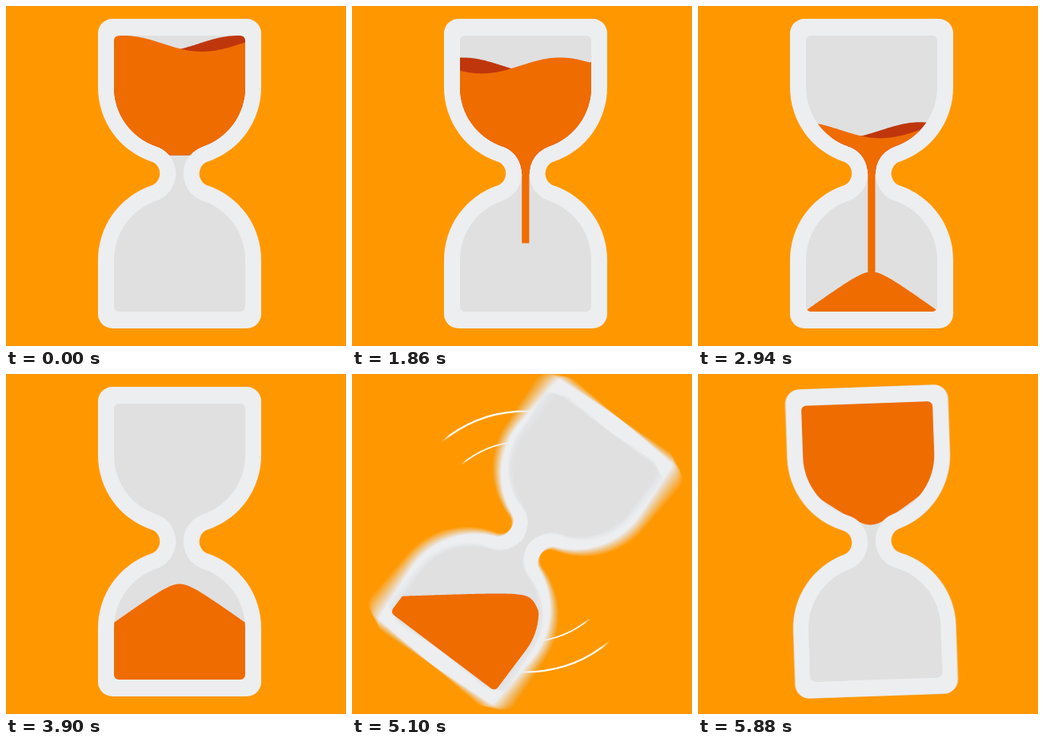
Recreate the animation shown at these times as an HTML page with a canvas. Size 425 px wide and 425 px high, loop 5940 ms.

```html
<!DOCTYPE html>
<html lang="en">
<head>
<meta charset="utf-8">
<title>Hourglass</title>
<style>
  html, body { margin: 0; width: 100%; height: 100%; overflow: hidden; background: #ff9800; }
  canvas { display: block; }
</style>
</head>
<body>
<canvas id="stage" width="425" height="425"></canvas>
<script>
const SIZE = 425, CX = 217, CY = 209.5;
const LOOP = 5940, STEP = 60;
const RAD = Math.PI / 180;
const BG = '#ff9800', FRAME = '#edeef0', GLASS = '#e0e0e0', SAND = '#ef6c00', SHADE = '#bf360c';

const ctx = document.getElementById('stage').getContext('2d');
const layer = document.createElement('canvas');
layer.width = layer.height = SIZE;
const lctx = layer.getContext('2d');

// Progress of t from a to b, clamped to 0..1.
const part = (t, a, b) => Math.min(1, Math.max(0, (t - a) / (b - a)));

// Smooth curve through [time, value] points.
function curve(pts, t) {
  const n = pts.length - 1;
  if (t <= pts[0][0]) return pts[0][1];
  if (t >= pts[n][0]) return pts[n][1];
  let i = 0;
  while (t > pts[i + 1][0]) i++;
  const slope = k => {
    const a = pts[Math.max(0, k - 1)], b = pts[Math.min(n, k + 1)];
    return (b[1] - a[1]) / (b[0] - a[0]);
  };
  const [x0, y0] = pts[i], [x1, y1] = pts[i + 1];
  const d = x1 - x0, u = (t - x0) / d, v = 1 - u;
  return y0 * v * v * (1 + 2 * u) + slope(i) * d * u * v * v
       + y1 * u * u * (1 + 2 * v) - slope(i + 1) * d * u * u * v;
}

// Swings back, turns over, overshoots and settles.
const TURN = [[4560, 0], [4830, -15], [5100, 37], [5400, 153], [5640, 196], [5880, 178], [5940, 180]];
const angle = t => curve(TURN, t);

// Half-profile arcs of the glass, grown by o from the middle of its wall.
function outline(o) {
  const p = new Path2D();
  const w = 92 + o, h = 183 + o * 1.04, r = 12 + o * 0.6;
  const big = 88 + o, neck = 26 - o, nx = 40.7, by = 107.9;
  const a = Math.atan2(by, nx - 4), PI = Math.PI;
  p.moveTo(0, -h);
  p.arcTo(w, -h, w, 0, r);
  p.arc(4, -by, big, 0, a);
  p.arc(nx, 0, neck, PI + a, PI - a, true);
  p.arc(4, by, big, -a, 0);
  p.arcTo(w, h, 0, h, r);
  p.arcTo(-w, h, -w, 0, r);
  p.arc(-4, by, big, PI, PI + a);
  p.arc(-nx, 0, neck, a, -a, true);
  p.arc(-4, -by, big, PI - a, PI);
  p.arcTo(-w, -h, 0, -h, r);
  p.closePath();
  return p;
}
const outer = outline(10), inner = outline(-10);

function inGlass(c, deg, paint) {
  c.save();
  c.translate(CX, CY);
  c.rotate(deg * RAD);
  paint();
  c.restore();
}

function drawTrails(c, t) {
  const w = 14 * Math.sin(Math.PI * part(t, 5010, 5720)) ** 2;
  if (w < 0.1) return;
  const tail = 50 + 0.31 * (t - 5100);
  for (const side of [0, 180]) {
    const start = (tail + side) * RAD;
    const fade = c.createConicGradient(start, CX, CY);
    fade.addColorStop(0, 'rgba(255,255,255,0)');
    fade.addColorStop(0.004 + w * 0.0045, '#fff');
    fade.addColorStop(0.9, '#fff');
    c.strokeStyle = fade;
    for (const r of [163, 125.5]) {
      c.lineWidth = w * (r > 150 ? 1 : 0.86);
      c.beginPath();
      c.arc(CX, CY, r, start, start + 72 * RAD);
      c.stroke();
    }
  }
}

function drawScene(c, t, deg) {
  c.fillStyle = BG;
  c.fillRect(0, 0, SIZE, SIZE);
  drawTrails(c, t);
  inGlass(c, deg, () => {
    c.fillStyle = FRAME;
    c.fill(outer);
    c.fillStyle = GLASS;
    c.fill(inner);
  });
}

// Averages several turned copies for the motion blur.
function drawBlurred(t, deg) {
  const smear = (angle(t + 30) - angle(t - 30)) * 0.43;
  const n = Math.abs(smear) > 0.05 ? 20 : 1;
  for (let i = 0; i < n; i++) {
    drawScene(lctx, t, deg + smear * ((i + 0.5) / n - 0.5));
    ctx.globalAlpha = 1 / (i + 1);
    ctx.drawImage(layer, 0, 0);
  }
  ctx.globalAlpha = 1;
}

function fillUnder(surface, bottom, color) {
  ctx.beginPath();
  ctx.moveTo(-84, bottom);
  for (let x = -84; x <= 84; x += 2) ctx.lineTo(x, Math.min(surface(x), bottom));
  ctx.lineTo(84, bottom);
  ctx.fillStyle = color;
  ctx.fill();
}

function drawUpperSand(t) {
  const level = -162.5 + 115 * (t / 3000) ** 3;
  const tip = -23 + 110 * (t / 1860) ** 2.4;
  const top = 73 * part(t, 3360, 3600) ** 2 - 0.5;
  const n = t / STEP, k = 2 * Math.PI / 196;
  const trough = 28 + 3.65 * n, crest = 73 + 7.75 * n;
  const bottom = Math.min(tip, 0.5);
  fillUnder(x => level - 10 * Math.cos(k * (x - crest)), bottom, SHADE);
  fillUnder(x => level + 10 * Math.cos(k * (x - trough)), bottom, SAND);
  if (tip > top) {
    ctx.fillStyle = SAND;
    ctx.fillRect(-4.7, top, 9.2, tip - top);
  }
}

// A rounded heap that grows, slides to one side in the turn and sinks to the neck.
function drawLowerSand(t) {
  const drop = 122 * (1 - part(t, 2340, 3900)) ** 1.15;
  const peak = 53 + drop - 32 * part(t, 5400, 5880);
  const shift = 62 * Math.sin(Math.PI * part(t, 4800, 5880));
  const steep = 0.72 + 0.002 * shift;
  fillUnder(x => peak + Math.hypot(12, steep * (x - shift)) - 12, 180, SAND);
}

function draw(t) {
  const deg = angle(t);
  drawBlurred(t, deg);
  inGlass(ctx, deg, () => {
    ctx.clip(inner);
    if (t < 3600) drawUpperSand(t);
    if (t > 2340) drawLowerSand(t);
  });
}

let begin = null;
function tick(now) {
  if (begin === null) begin = now;
  const t = (now - begin) % LOOP;
  draw(Math.floor(t / STEP) * STEP);
  requestAnimationFrame(tick);
}
draw(0);
requestAnimationFrame(tick);
</script>
</body>
</html>
```
